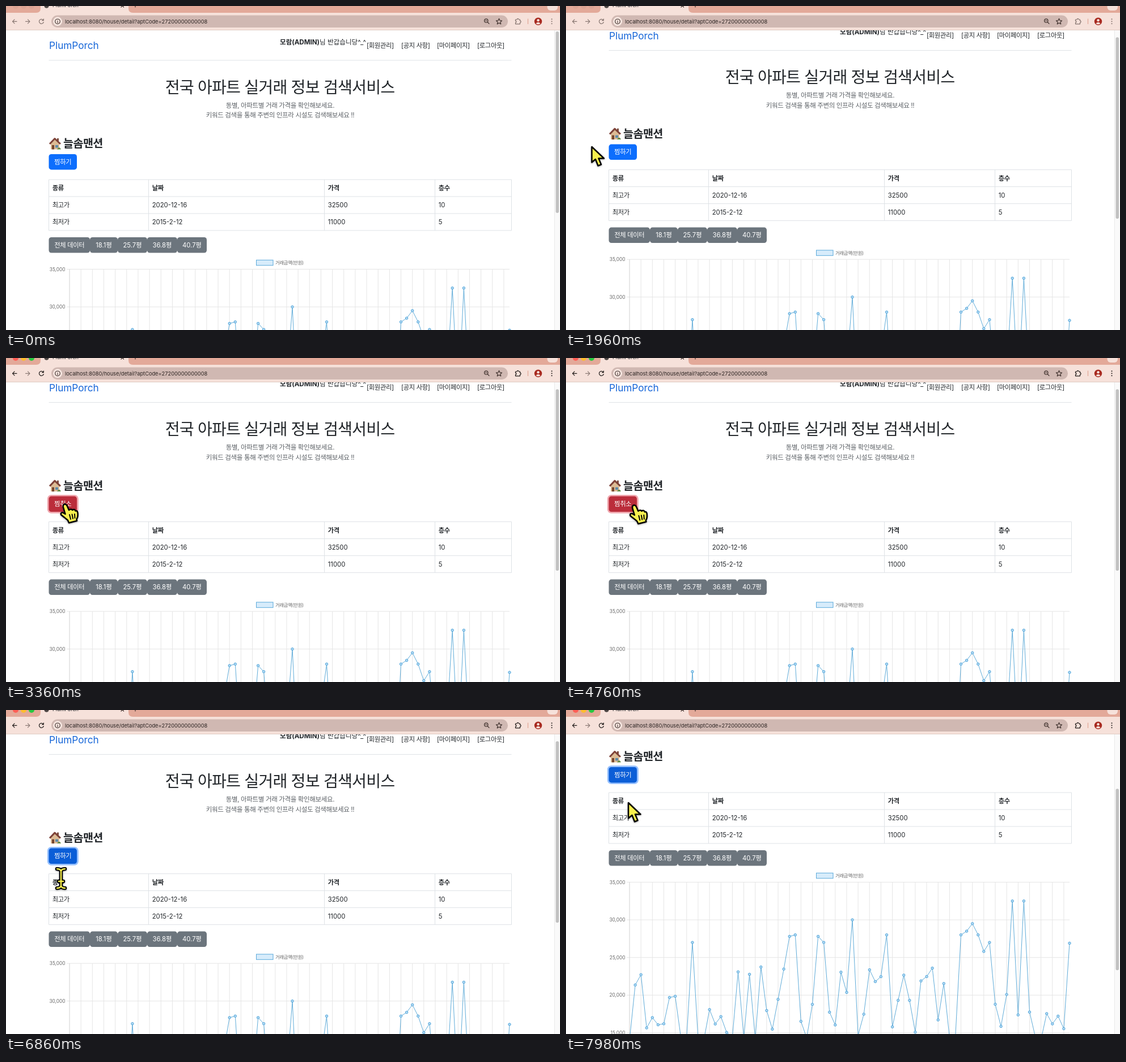
These frames come from a looping animation (977x573 px, 8 s). An HTML page:

```html
<!DOCTYPE html>
<html lang="ko">
<head>
<meta charset="utf-8">
<title>PlumPorch</title>
<style>
html, body { margin: 0; width: 100%; height: 100%; overflow: hidden; background: #fff; }
svg { display: block; width: 977px; height: 573px; }
text { font-family: Inter, "Noto Sans CJK KR", "Noto Sans CJK JP", sans-serif; font-size: 11.3px; fill: #212529; white-space: pre; }
.ko { letter-spacing: -.03em; }
.bold { font-weight: 700; }
.mid { text-anchor: middle; }
.end { text-anchor: end; }
.white { fill: #fff; }
.axis { font-size: 8.3px; fill: #666; }
.sub { font-size: 11.5px; fill: #5c6166; }
.icon { fill: none; stroke: #40322e; stroke-width: 1.2; stroke-linecap: round; stroke-linejoin: round; }
.cursor { filter: drop-shadow(0 1.5px 1.5px rgba(0, 0, 0, .35)); }
.cursor path { stroke-linejoin: round; stroke-linecap: round; }
</style>
</head>
<body>
<svg id="stage" viewBox="0 0 977 573" xmlns="http://www.w3.org/2000/svg"></svg>
<script>
const stage = document.getElementById('stage');
const LOOP = 8000, STEP = 70, FOCUS = 2730;

const text = (x, y, s, cls = 'ko', attrs = '') => `<text x="${x}" y="${y}" class="${cls}" ${attrs}>${s}</text>`;
const rect = (x, y, w, h, fill, r = 0, attrs = '') =>
  `<rect x="${x}" y="${y}" width="${w}" height="${h}" rx="${r}" fill="${fill}" ${attrs}/>`;
const path = (d, attrs = '') => `<path d="${d}" ${attrs}/>`;
const circle = (x, y, r, attrs) => `<circle cx="${x}" cy="${y}" r="${r}" ${attrs}/>`;
const range = n => [...Array(n).keys()];

function header() {
  const nav = [[636, '[회원관리]'], [697, '[공지 사항]'], [760, '[마이페이지]'], [831, '[로그아웃]']];
  return text(76, 76, 'PlumPorch', '', 'style="font-size:17.2px;fill:#1565d8"') +
    text(483, 67.5, '<tspan class="bold">모람(ADMIN)</tspan>님 반갑습니당^_^', '', 'style="font-size:11.6px"') +
    nav.map(([x, s]) => text(x, 73.5, s)).join('') +
    path('M75.5 96H891.5', 'stroke="#dee2e6"') +
    text(483, 153.5, '전국 아파트 실거래 정보 검색서비스', 'ko mid', 'style="font-size:28.2px"') +
    text(483.5, 179.5, '동별, 아파트별 거래 가격을 확인해보세요.', 'ko mid sub') +
    text(483.5, 197, '키워드 검색을 통해 주변의 인프라 시설도 검색해보세요 !!', 'ko mid sub');
}

function house() {
  return rect(90, 234, 3, 7, '#7a4b3c') +
    path('M79 243L86.5 236 94 243V253.5H79Z', 'fill="#dcbb94"') +
    path('M77 244L86 234.5 96 244', 'fill="none" stroke="#7d4238" stroke-width="3" stroke-linejoin="round"') +
    rect(81, 246, 4, 7.5, '#75452d') + rect(87, 246, 5, 4.5, '#5f8ba8') +
    path('M90 253.5Q94 247 97 253.5Z', 'fill="#5f8a40"');
}

function table() {
  const cols = [75.5, 251.5, 561.5, 756.5, 891.5];
  const rows = [['종류', '날짜', '가격', '층수'], ['최고가', '2020-12-16', '32500', '10'], ['최저가', '2015-2-12', '11000', '5']];
  const lines = cols.map(x => `M${x} 307V397`).join('') + range(4).map(i => `M75.5 ${307 + 30 * i}H891.5`).join('');
  return path(lines, 'stroke="#dee2e6"') +
    rows.map((row, r) => row.map((s, c) =>
      text(cols[c] + 6.2, 326.2 + 30 * r, s, (c && r ? '' : 'ko') + (r ? '' : ' bold'))).join('')).join('');
}

function filters() {
  const edges = [75.5, 148, 197, 249, 302, 354];
  return ['전체 데이터', '18.1평', '25.7평', '36.8평', '40.7평'].map((s, i) => {
    const w = edges[i + 1] - edges[i];
    return rect(edges[i], 409, w, 27.5, '#6c757d', 4.5) + text(edges[i] + w / 2, 426.8, s, (i ? '' : 'ko') + ' mid white');
  }).join('');
}

function chart() {
  const top = 465.5, gap = 66.6, left = 112, count = 78, dx = 776 / (count - 1);
  // prices (in thousands) of the notable sales; the rest are ordinary
  const peaks = { 11: 27, 28: 27.8, 29: 28, 33: 27.8, 34: 27, 39: 30, 45: 28, 58: 28, 59: 28.5, 60: 29.5, 61: 28,
    62: 25.8, 63: 27, 67: 32.5, 69: 32.5, 77: 26.9 };
  let seed = 29;
  const random = () => (seed = seed * 16807 % 2147483647) / 2147483647;
  const points = range(count).map(i => {
    const usual = 14 + 10 * random() ** 1.5;
    return [left + i * dx, top + (35 - (peaks[i] ?? usual)) / 5 * gap].map(v => v.toFixed(1));
  });
  const columns = range(38).map(i => `M${left + (i + 1) * 2 * dx} ${top}V850`).join('');
  const rows = range(6).map(i => `M107 ${top + i * gap}H888`).join('');
  return rect(441.5, 449.3, 29.5, 9.4, '#d7ecfb', 0, 'stroke="#5ba9da"') +
    text(475, 457, '거래금액(만원)', 'ko axis') +
    path(columns + rows, 'stroke="#e5e5e5"') + path(`M${left} ${top}V850`, 'stroke="#cfcfcf"') +
    range(6).map(i => text(104.5, top + i * gap + 3, `${35 - 5 * i},000`, 'axis end')).join('') +
    path('M' + points.join('L'), 'fill="none" stroke="#5fabd8" stroke-linejoin="round"') +
    points.map(([x, y]) => circle(x, y, 2.2, 'fill="#b5dbf3" stroke="#4ca3da"')).join('');
}

function browser() {
  const url = 'localhost:8080/house/detail?aptCode=27200000000008';
  return rect(0, 0, 977, 42.5, '#f6e1da') +
    path('M0 0H61V4Q61 12 53 12H0ZM216 0H977V12H224Q216 12 216 4Z', 'fill="#e3a999"') +
    path('M0 42.5H977', 'stroke="#e0cbc4"') +
    range(3).map(i => circle(17 + 14 * i, 0, 5, 'class="light"')).join('') +
    circle(71.5, -.5, 4.2, 'fill="#4d4644"') +
    text(82, 2.4, 'PlumPorch', '', 'style="font-size:9px"') +
    path('M203 -3L207.500 2M207.5 -3L203 2M228 -3V2', 'class="icon"') +
    rect(954.5, -10, 18.5, 18, '#f6e1da', 6) +
    rect(80, 16.5, 805, 21.5, '#d0b8b2', 10.75) +
    circle(91, 27.3, 8, 'fill="#f6e6e0"') +
    circle(91, 27.3, 4.3, 'class="icon"') + path('M91 27V29.5M91 25V25.1', 'class="icon"') +
    text(104, 30.6, url, '', 'style="font-size:9.25px;fill:#2b2321"') +
    path('M19 27.3H11.5M15 23.8L11.5 27.3 15 30.8M65.5 24.8A4 4 0 1 0 66.3 28.5M66.3 22.8V25.6H63.5', 'class="icon live"') +
    path('M34.5 27.3H42M38.5 23.8L42 27.3 38.5 30.8', 'class="icon" style="stroke:#8b7a75"') +
    circle(846.8, 26, 3.2, 'class="icon"') + path('M849.2 28.5L852 31.4M845.3 26H848.3', 'class="icon"') +
    path('M869.5 22.3L871 25.7 874.6 26 871.9 28.4 872.7 32 869.5 30.1 866.3 32 867.1 28.4 864.4 26 868 25.7Z', 'class="icon"') +
    path('M898.5 24H901.2A1.6 1.6 0 0 1 904.4 24H906.5V26.2A1.6 1.6 0 0 1 906.5 29.4V31.8H898.5V29.4A1.5 1.5 0 0 0 898.5 26.4Z', 'class="icon live"') +
    path('M920.5 22.5V32', 'stroke="#e3a999" stroke-width="1.3"') +
    circle(938.5, 27.2, 6.7, 'fill="#a82a20"') + circle(938.5, 25.3, 2.2, 'fill="#f6e1da"') +
    path('M934.5 31Q938.5 26.5 942.5 31Q938.5 34 934.5 31Z', 'fill="#f6e1da"') +
    range(3).map(i => path(`M962.5 ${23.3 + 4 * i}v.01`, 'class="icon live" style="stroke-width:2"')).join('');
}

function cursors() {
  const ink = 'fill="#f8f04e" stroke="#000" stroke-width="2.5"';
  const beam = 'M-7 -17Q-1 -17 0 -13Q1 -17 7 -17M0 -13V13M-7 17Q-1 17 0 13Q1 17 7 17M-4 5H4';
  const hand = 'M-1 2C1 .5 4 2 5 5L8 12C10 10 13 10 14 12C16 10 19 11 19.5 13.5C22 12.5 23 14 23.5 17C24 22 24 25 21.5 28L22 31 8 34.5 6 30C3 27 -3 23 -6 20C-7 17 -4 15 -1 17.5L1.5 19 -2 7C-2.5 5 -2 3 -1 2Z';
  return `<g class="cursor">
    <g id="arrow">${path('M.5 3V30.5L7 25 11.5 36.5 17 34.3 12.5 23.5H22Z', ink)}</g>
    <g id="hand">${path(hand, ink)}${path('M9 20L11 28M13.5 19.5L15 27M18 19L18.5 26', 'stroke="#000" stroke-width="1.9"')}</g>
    <g id="beam">${path(beam, 'fill="none" stroke="#000" stroke-width="6.5"')}${path(beam, 'fill="none" stroke="#f8f04e" stroke-width="2.5"')}</g>
  </g>`;
}

stage.innerHTML = `<g id="page">${header()}${house()}
  ${text(101, 250.3, '늘솜맨션', 'ko', 'style="font-size:19.6px;font-weight:600"')}
  ${rect(72.8, 259.3, 55, 32.8, '#fff', 7, 'id="ring" fill-opacity=".5"')}
  ${rect(75.5, 262, 49.5, 27.4, '#0d6efd', 4.5, 'id="button"')}
  ${text(100.2, 279.7, '찜하기', 'ko mid white', 'id="label" font-weight="500"')}
  ${table()}${filters()}${chart()}</g>
  ${rect(967, 43, 10, 530, '#fafafa')}${path('M967.5 43V573', 'stroke="#e8e8e8"')}
  ${rect(969.5, 45, 5.5, 321, '#c1c1c1', 2.75, 'id="thumb"')}
  ${browser()}${cursors()}`;

const el = id => document.getElementById(id);
const [page, ring, button, label, thumb] = ['page', 'ring', 'button', 'label', 'thumb'].map(el);
const pointers = ['arrow', 'hand', 'beam'].map(el);
const lights = stage.querySelectorAll('.light');
const live = stage.querySelectorAll('.live');

// each glide: start, end, then the values to reach
const moves = [[0, 630, 394, 331], [840, 1050, 178, 264], [1050, 1400, 91, 256], [1470, 1960, 45, 246],
  [1960, 2310, 176, 264], [2310, 2590, 103, 257], [4060, 4270, 142, 262], [4550, 4900, 107, 257],
  [5600, 5740, 116, 265], [5880, 6230, 168, 210], [6230, 6720, 97, 298], [6860, 7140, 104, 313], [7770, 7980, 109.5, 161]];
const scrolls = [[700, 770, 17.4], [7350, 7560, 161]];

const ramp = (t, from, to) => Math.min(1, Math.max(0, (t - from) / (to - from)));
const ease = p => p * p * (3 - 2 * p);
const glide = (first, legs, t) => legs.reduce((pos, [from, to, ...goal]) =>
  pos.map((v, i) => v + (goal[i] - v) * ease(ramp(t, from, to))), first);
const inside = (x, y, l, t, r, b) => x >= l && x <= r && y >= t && y <= b;

function pointerKind(x, y, focused) {
  if (!focused) return 0;
  if (inside(x, y, 75, 262, 125, 289)) return 1;
  return inside(x, y, 82, 312, 103, 331) || inside(x, y, 101, 232, 171, 255) ? 2 : 0;
}

function draw(t) {
  const focused = t >= FOCUS;
  const [scroll] = glide([0], scrolls, t), [x, y] = glide([700, 620], moves, t);
  page.setAttribute('transform', `translate(0 ${-scroll})`);
  thumb.setAttribute('y', 45 + scroll * .585);

  const red = ramp(t, 3150, 3360) * (1 - ramp(t, 5110, 5390)) * 100;
  const mix = (a, b) => `color-mix(in srgb, ${a} ${red}%, ${b})`;
  button.style.fill = mix('#bb2d3b', focused ? '#0b5ed7' : '#0d6efd');
  ring.style.fill = mix('#e15361', '#3184fd');
  ring.style.opacity = ramp(t, 2800, 3010);
  label.textContent = t >= 3220 && t < 5250 ? '찜취소' : '찜하기';

  lights.forEach((c, i) => c.style.fill = focused ? ['#fe5f57', '#febc2e', '#28c840'][i] : '#dba393');
  live.forEach(p => p.style.stroke = focused ? '#1f1a18' : '#84736e');

  const kind = pointerKind(x, y + scroll, focused);
  pointers.forEach((p, i) => {
    p.style.display = i === kind ? '' : 'none';
    p.setAttribute('transform', `translate(${x} ${y})`);
  });
}

let start;
function tick(now) {
  start ??= now;
  draw(Math.floor((now - start) % LOOP / STEP) * STEP);
  requestAnimationFrame(tick);
}
draw(0);
requestAnimationFrame(tick);
</script>
</body>
</html>
```
